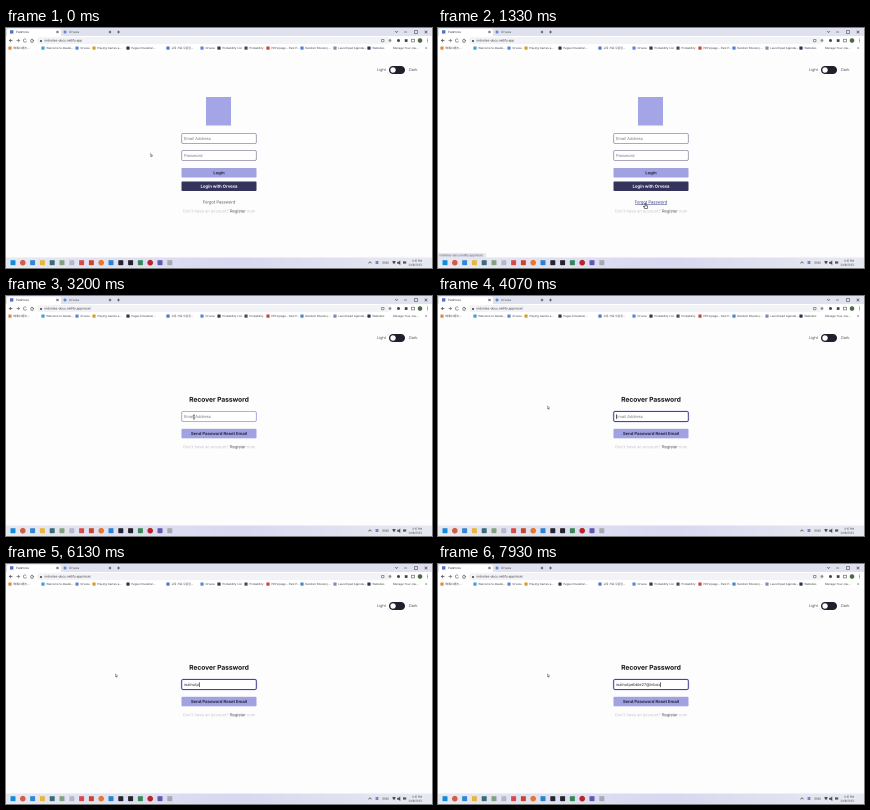
An HTML page with a canvas that plays this animation: 426 by 240 pixels, repeating every 8000 ms.

```html
<!DOCTYPE html>
<html lang="en">
<head>
<meta charset="utf-8">
<title>Password recovery</title>
<style>
  html, body { margin: 0; width: 100%; height: 100%; overflow: hidden; background: #fdfdfe; }
  canvas { display: block; width: 100vw; height: 100vh; }
</style>
</head>
<body>
<canvas id="stage"></canvas>
<script>
const W = 426, H = 240, LOOP = 8000, DETAIL = 4;
const canvas = document.getElementById('stage');
const view = canvas.getContext('2d');

// The scene is painted large and scaled down, which keeps tiny text smooth.
const scene = document.createElement('canvas');
scene.width = W * DETAIL;
scene.height = H * DETAIL;
const ctx = scene.getContext('2d');
ctx.scale(DETAIL, DETAIL);

const NAVY = '#34335c', LILAC = '#a0a2e2', INK = '#17171f', GREY = '#7c7c88', FAINT = '#c6c6ce';
const PAGE_CHANGE = 1870, FOCUS = 3420, TYPE_START = 5290, TYPE_STEP = 130;
const ADDRESS = 'walnutpebble27@inbox';

function box(x, y, w, h, fill, radius = 0, stroke, line = 1) {
  ctx.beginPath();
  ctx.roundRect(x, y, w, h, radius);
  if (fill) { ctx.fillStyle = fill; ctx.fill(); }
  if (stroke) { ctx.strokeStyle = stroke; ctx.lineWidth = line; ctx.stroke(); }
}

function dot(x, y, r, fill) {
  ctx.beginPath();
  ctx.arc(x, y, r, 0, 7);
  ctx.fillStyle = fill;
  ctx.fill();
}

// Draws text centred vertically on y and returns its width.
function text(str, x, y, size, color = INK, weight = 400, align = 'left') {
  ctx.font = `${weight} ${size}px Inter, "Noto Sans CJK SC", "Noto Sans CJK JP", sans-serif`;
  ctx.textRendering = 'geometricPrecision';
  ctx.textAlign = align;
  ctx.textBaseline = 'middle';
  ctx.fillStyle = color;
  ctx.fillText(str, x, y);
  return ctx.measureText(str).width;
}

function path(points, color, line = 0.7, fill) {
  ctx.beginPath();
  points.forEach(([x, y]) => ctx.lineTo(x, y));
  if (fill) { ctx.closePath(); ctx.fillStyle = fill; ctx.fill(); }
  ctx.strokeStyle = color;
  ctx.lineWidth = line;
  ctx.stroke();
}

function cross(x, y, r = 1.1) {
  path([[x - r, y - r], [x + r, y + r]], '#555');
  path([[x + r, y - r], [x - r, y + r]], '#555');
}

const BOOKMARKS = [
  [4, '#e08a3c', '時事口語大…'], [37, '#35a0dc', 'Welcome to Reade…'],
  [71, '#5b87d8', 'Orvexa'], [88, '#d99a2b', 'Playing Games a…'],
  [122, '#333', 'Pages Emulation…'], [162, '#4f74c8', '교육 자료 모음집…'],
  [196, '#5b87d8', 'Orvexa'], [213, '#38383f', 'Probability List'],
  [240, '#4a4a55', 'Probability'], [262, '#cc4038', 'PDFs/page - Past P…'],
  [296, '#4a83d8', 'Random Ebooks j…'], [329, '#7f8ab5', 'Launchpad Agenda…'],
  [363, '#29324f', 'Websites'], [387, null, 'Manage Your Jou…']
];

function browser(recovering) {
  box(0, 0, W, 8, '#dfe1ef');
  box(1, 0.6, 54, 8, '#fff', [2, 2, 0, 0]);
  box(4, 2.2, 3.4, 3.4, '#5272cc', 0.5);
  text('Padmoss', 10, 4.1, 3, '#444');
  cross(51.5, 4);
  dot(59, 4, 1.5, '#5b87d8');
  text('Orvexa', 63, 4.1, 3, '#555');
  cross(104, 4);
  path([[111, 4], [114, 4]], '#444');
  path([[112.5, 2.5], [112.5, 5.5]], '#444');
  path([[389, 3], [390.5, 4.5], [392, 3]], '#555', 0.6);
  path([[398, 4], [401, 4]], '#555', 0.6);
  box(408.5, 2.5, 3, 3, null, 0, '#555', 0.6);
  cross(420, 4, 1.3);

  box(0, 8, W, 16, '#fff');
  box(31, 9, 354, 7, '#f2f3f6', 3.5);
  path([[6.5, 12.5], [3.5, 12.5], [5, 11], [3.5, 12.5], [5, 14]], '#555');
  path([[10.5, 12.5], [13.5, 12.5], [12, 11], [13.5, 12.5], [12, 14]], '#777');
  ctx.beginPath();
  ctx.arc(19, 12.5, 1.6, 0.4, 5.6);
  ctx.stroke();
  path([[24.3, 12.6], [26, 11], [27.7, 12.6], [27, 12.6], [27, 14.2], [25, 14.2], [25, 12.6]], '#555', 0.6);
  box(34, 12, 2, 2, '#666');
  text('mdnotes-docu.netlify.app' + (recovering ? '/reset' : ''), 38.5, 12.6, 3.1, '#3c3c44');
  box(375.5, 11.3, 2.5, 2.5, null, 0.5, '#666', 0.6);
  dot(384, 12.5, 1.4, '#8d8d98');
  dot(392.5, 12.5, 1.5, '#44444c');
  box(398.8, 11.2, 2.7, 2.7, '#3b3b43');
  box(405.5, 11.2, 3, 2.7, null, 0, '#555', 0.6);
  dot(414, 12.5, 2.3, '#4d6846');
  [11, 12.5, 14].forEach(y => dot(421.5, y, 0.45, '#444'));

  for (const [x, color, label] of BOOKMARKS) {
    if (color) box(x - 1.6, 18.5, 3.2, 3.2, color, 0.5);
    text(label, x + (color ? 3.3 : 0), 20.2, 2.8, '#4a4a54');
  }
  text('»', 419, 20, 4, '#555');
}

const TASK_COLORS = ['#168bdc', '#d65c43', '#3387d3', '#e7b63c', '#3d6a78', '#83a37f',
  '#b9b6ca', '#d94b4a', '#c84630', '#e6762f', '#2783cf', '#23242c', '#222329', '#368658',
  '#bd2228', '#6555ad', '#a5a8b5'];

function taskbar() {
  const shade = ctx.createLinearGradient(0, 0, W, 0);
  shade.addColorStop(0, '#e6e8f1');
  shade.addColorStop(0.55, '#d8d9f1');
  shade.addColorStop(1, '#e8eaf0');
  box(0, 229.5, W, 10.5, shade);
  TASK_COLORS.forEach((color, i) => {
    const x = 7 + i * 9.8;
    if ([1, 9, 14].includes(i)) dot(x, 234.7, 2.8, color);
    else box(x - 2.5, 232.2, 5, 5, color, 0.7);
  });
  path([[362.5, 235.3], [364, 233.8], [365.5, 235.3]], '#555');
  box(369.5, 233, 3, 3, '#7b83bd', 0.6);
  text('ENG', 376.5, 234.8, 3, '#333');
  path([[386.5, 233.7], [388, 233], [389.5, 233.7], [388, 235.8]], '#444', 0.5, '#555');
  path([[391.5, 234], [393, 234], [394, 233], [394, 236.5], [393, 235.5], [391.5, 235.5]], '#444', 0.5, '#555');
  box(397, 233.4, 3.2, 2.2, '#555');
  text('3:15 PM', 416, 233, 2.7, '#3d3d46', 400, 'right');
  text('24/8/2022', 416, 237, 2.7, '#3d3d46', 400, 'right');
}

function themeSwitch() {
  text('Light', 371, 41.8, 3.8, '#55555e');
  box(383, 38, 16, 8, '#20202c', 4);
  dot(387, 42, 2.7, '#fff');
  text('Dark', 403, 41.8, 3.8, '#55555e');
}

function field(y, focused, hovered) {
  if (focused) box(175.7, y, 74.6, 10, null, 2, '#d5d6f5', 2);
  const border = focused ? '#45459a' : hovered ? '#9294de' : '#8e8ea6';
  box(175.7, y, 74.6, 10, '#fff', 1.5, border, focused ? 1 : 0.8);
}

function button(label, y, fill, color) {
  box(175.5, y, 75, 9.5, fill, 1);
  text(label, 213, y + 4.9, 4.2, color, 700, 'center');
}

function registerLine(y) {
  let x = 177;
  x += text("Don't have an account? ", x, y, 4.12, FAINT);
  x += text('Register ', x, y, 4.12, '#55555f');
  text('now', x, y, 4.12, FAINT);
}

function loginPage(hovering) {
  box(200, 69, 25, 28.5, '#a3a5e6');
  field(105.5);
  text('Email Address', 178, 110.8, 4, GREY);
  field(122.5);
  text('Password', 178, 127.8, 4, GREY);
  button('Login', 140, LILAC, '#2b2a4a');
  button('Login with Orvexa', 153.5, NAVY, '#fff');
  text('Forgot Password', 213, 174.3, 4.1, hovering ? '#34348a' : '#55555f', 400, 'center');
  if (hovering) {
    box(197, 176.4, 32, 0.5, '#34348a');
    box(0, 225, 48, 4.6, '#e4e6ef', [0, 1, 0, 0]);
    text('mdnotes-docu.netlify.app/reset', 1.5, 227.3, 2.9, '#55555f');
  }
  registerLine(183.2);
}

function recoverPage(t, hovering) {
  const focused = t >= FOCUS;
  const count = t < TYPE_START ? 0 : Math.min(ADDRESS.length, 1 + Math.floor((t - TYPE_START) / TYPE_STEP));
  text('Recover Password', 213, 103.8, 6.6, '#101014', 700, 'center');
  field(115.5, focused, hovering);
  const typed = ADDRESS.slice(0, count);
  const width = text(typed || 'Email Address', 178, 120.8, 4, typed ? '#33333c' : GREY);
  const caretOn = count > 0 || Math.floor((t - 3000) / 500) % 2 === 0;
  if (focused && caretOn) box(178 + (count ? width : 0), 118.3, 0.6, 4.8, INK);
  button('Send Password Reset Email', 132.8, LILAC, '#2b2a4a');
  registerLine(151);
}

// Pointer stops: time, x, y
const STOPS = [[0, 144.5, 125.5], [350, 144.5, 125.5], [1150, 207.5, 175.5], [2350, 207.5, 175.5],
  [3050, 188, 121], [3500, 188, 121], [3950, 109.5, 110], [LOOP, 109.5, 110]];

function pointerAt(t) {
  const i = STOPS.findIndex(stop => stop[0] > t);
  const [t0, x0, y0] = STOPS[i - 1], [t1, x1, y1] = STOPS[i];
  const p = (t - t0) / (t1 - t0), ease = p * p * (3 - 2 * p);
  return [x0 + (x1 - x0) * ease, y0 + (y1 - y0) * ease];
}

function pointer(x, y, kind) {
  if (kind === 'beam') {
    path([[x, y - 2], [x, y + 2]], '#333', 0.7);
    path([[x - 1, y - 2], [x + 1, y - 2]], '#333', 0.5);
    path([[x - 1, y + 2], [x + 1, y + 2]], '#333', 0.5);
  } else if (kind === 'hand') {
    path([[x - 0.5, y], [x + 0.5, y], [x + 0.5, y + 2], [x + 2.3, y + 2.6], [x + 1.8, y + 5],
      [x - 0.8, y + 5], [x - 2, y + 2.8], [x - 0.5, y + 3], [x - 0.5, y]], '#333', 0.6, '#fff');
  } else {
    path([[x, y], [x, y + 2.9], [x + 0.7, y + 2.3], [x + 1.2, y + 3.3], [x + 1.6, y + 3.1],
      [x + 1.2, y + 2.1], [x + 2.1, y + 2], [x, y]], '#555', 0.4, '#fff');
  }
}

function draw(t) {
  box(0, 0, W, H, '#fdfdfe');
  const recovering = t >= PAGE_CHANGE;
  const [x, y] = pointerAt(t);
  const onLink = !recovering && x > 197 && x < 229 && y > 171 && y < 178;
  const onField = recovering && x > 175 && x < 251 && y > 115 && y < 126;
  browser(recovering);
  themeSwitch();
  if (recovering) recoverPage(t, onField);
  else loginPage(onLink);
  taskbar();
  pointer(x, y, onLink ? 'hand' : onField ? 'beam' : 'arrow');
  view.imageSmoothingQuality = 'high';
  view.drawImage(scene, 0, 0, canvas.width, canvas.height);
}

function resize() {
  canvas.width = Math.round(innerWidth * devicePixelRatio);
  canvas.height = Math.round(innerHeight * devicePixelRatio);
}

addEventListener('resize', resize);
resize();
const start = performance.now();
function tick() {
  draw((performance.now() - start) % LOOP);
  requestAnimationFrame(tick);
}
tick();
</script>
</body>
</html>
```
